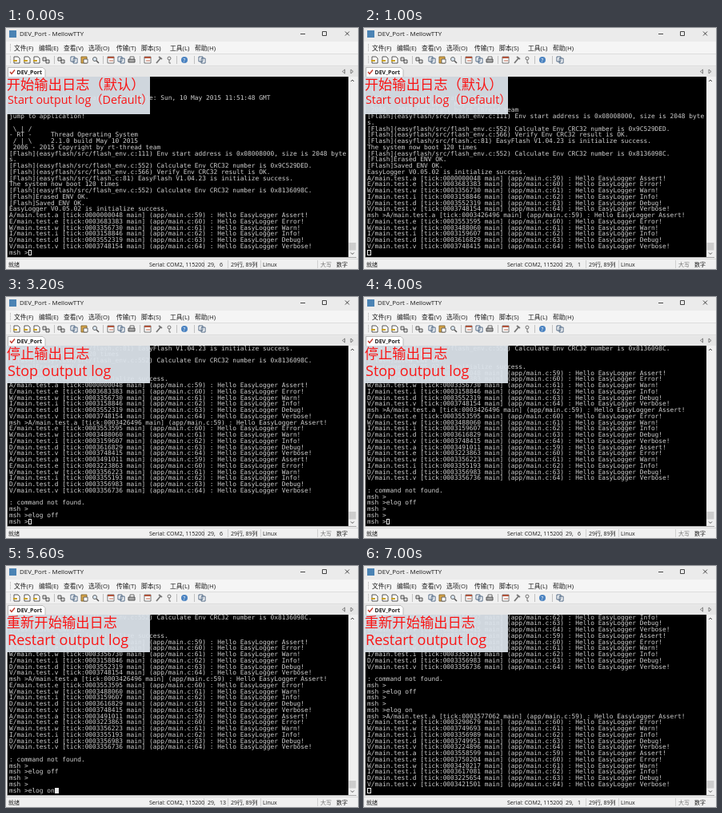
An HTML page for the animation above (8 s loop, 440x302 px).

```html
<!DOCTYPE html>
<html lang="zh">
<head>
<meta charset="utf-8">
<title>Terminal log control</title>
<style>
html, body { margin: 0; width: 100%; height: 100%; overflow: hidden; background: #f0f0f0; }
#stage { position: relative; width: 440px; height: 302px; overflow: hidden; background: #f0f0f0; }
svg { position: absolute; left: 0; top: 0; font: 7.6px "Open Sans", "Noto Sans CJK SC", "Noto Sans CJK", sans-serif; fill: #1c1c1c; }
#term { position: absolute; left: 2px; top: 61px; width: 426px; height: 226px; overflow: hidden; background: #000; }
#log { position: absolute; margin: 0; left: 2px; top: -.4px; color: #cfcfcf; white-space: pre;
  font: 7.865px/7.75px "DejaVu Sans Mono", monospace; }
#cursor { position: absolute; top: 216.5px; width: 4.7px; height: 7.5px; box-sizing: border-box; border: 1px solid #e8e8e8; }
#note { position: absolute; left: 0; top: 61px; width: 180px; height: 47px; background: rgba(220, 228, 235, .94); }
#note text { fill: #fa1414; }
#note svg { font-size: 17.3px; }
</style>
</head>
<body>
<div id="stage">
  <svg width="440" height="302">
    <rect width="440" height="17" fill="#ebebeb"/>
    <rect x="4" y="3" width="9" height="9" fill="#4b83b4"/>
    <text x="17" y="10" font-size="7.9">DEV_Port - MellowTTY</text>
    <path d="M368 7.5h6M395.500 4.500h5v5h-5zM424 4.500l5 5m0-5l-5 5" fill="none" stroke="#333" stroke-width=".9"/>
    <rect y="17" width="440" height="16" fill="#f5f5f5"/>
    <g id="menu" font-size="7.8"></g>
    <rect y="32" width="440" height="15" fill="#f1f1f1"/>
    <path d="M0 32.500h440M0 47.500h440" stroke="#dcdcdc"/>
    <path d="M5.500 20v10M5.500 35v10" stroke="#aaa" stroke-dasharray="1 1"/>
    <g id="tools" stroke-width=".9"></g>
    <path d="M0 61V48.500h440V61z" fill="#e6e6e6"/>
    <path d="M2.500 61V49.500H46l3 3V61" fill="#fff" stroke="#aaa" stroke-width=".8"/>
    <path d="M5 55l2 2.500 4-5" fill="none" stroke="#c0392b" stroke-width="1.400"/>
    <text x="13.500" y="57.500" font-size="7" font-weight="700">DEV_Port</text>
    <path d="M423.500 52v5l-3-2.500zM431 52v5l3-2.500z" fill="none" stroke="#555" stroke-width=".7"/>
    <rect x="428" y="61" width="10" height="226" fill="#f0f0f0"/>
    <rect x="428.500" y="269" width="9" height="9.500" fill="#cdcdcd"/>
    <path d="M431 67l2-2 2 2M431 281.500l2 2 2-2" fill="none" stroke="#505050"/>
    <path d="M1.500 61V287.500H438" fill="none" stroke="#a8a8a8"/>
    <path d="M0 289.500h440" stroke="#d8d8d8"/>
    <path d="M247.500 291v10M277.500 291v10M318.500 291v10M389.500 291v10" stroke="#d0d0d0"/>
    <g id="status" font-size="7"></g>
  </svg>
  <div id="term"><pre id="log"></pre><div id="cursor"></div></div>
  <div id="note"><svg width="180" height="47">
    <text id="cn" x=".8" y="15.500"></text>
    <text id="en" x="2"></text>
  </svg></div>
</div>
<script>
const $ = id => document.getElementById(id);
const ROWS = 29, CHAR = 4.735, LOOP = 8000;

const texts = (id, y, items) => {
  $(id).innerHTML = items.map(([x, s, fill = '#1c1c1c']) => `<text x="${x}" y="${y}" fill="${fill}">${s}</text>`).join('');
};
texts('menu', 27.5, [[10, '文件(F)'], [41, '编辑(E)'], [72, '查看(V)'], [103, '选项(O)'],
  [138, '传输(T)'], [169, '脚本(S)'], [205, '工具(L)'], [236, '帮助(H)']]);
texts('status', 298.5, [[3, '就绪'], [179, 'Serial: COM2, 115200'], [252, '29,'], [267, ''],
  [281, '29行, 89列'], [321, 'Linux'], [393, '大写', '#777'], [413, '数字']]);
const column = $('status').children[3];

// Toolbar glyphs are drawn around their own centre.
const glyphs = {
  page: '<path d="M-3-4h5l2 2v6h-7z" fill="#fff" stroke="#444"/><path d="M-4 1h5" stroke="#c9a227" stroke-width="2"/>',
  link: '<path d="M-4-3h4v4h-4zM0 0h4v4h-4z" fill="#ddd" stroke="#444"/>',
  copy: '<path d="M-4-4h5v6h-5zM-1-2h5v6h-5z" fill="#fff" stroke="#3d5878"/>',
  paste: '<path d="M-4-4h7v8h-7z" fill="#d8a64a" stroke="#80622c"/><path d="M-1-1h5v5h-5z" fill="#fff" stroke="#555"/>',
  find: '<circle cx="-1" cy="-1" r="2.500" fill="#dceaf6" stroke="#555"/><path d="M1 1l3 3" stroke="#555" stroke-width="1.500"/>',
  print: '<path d="M-2-4h5v4h-5z" fill="#fff" stroke="#555"/><path d="M-4-1h8v4h-8z" fill="#aaa" stroke="#444"/>',
  sheet: '<path d="M-4-4h8v8h-8z" fill="#fff" stroke="#666"/><path d="M-4-3h8" stroke="#b3543c" stroke-width="2"/><path d="M-2 1h5" stroke="#b3543c"/>',
  tool: '<path d="M-3 4l5-6M0-4l4 3" fill="none" stroke="#777" stroke-width="1.800"/>',
  key: '<circle cy="-2" r="2" fill="none" stroke="#666"/><path d="M0 0v4h2" fill="none" stroke="#666"/>',
  help: '<circle r="4" fill="#4a82c0"/><text x="-1.700" y="2.500" font-size="7" fill="#fff">?</text>',
  bar: '<path d="M0-5v10" stroke="#bbb"/>'
};
$('tools').innerHTML = [[13, 'page'], [26, 'page'], [38, 'page'], [50, 'link'], [60.5, 'bar'], [69, 'link'],
  [85, 'copy'], [98, 'paste'], [112, 'find'], [121.5, 'bar'], [131, 'sheet'], [144, 'copy'], [157, 'print'],
  [167.5, 'bar'], [177, 'sheet'], [191, 'tool'], [204, 'key'], [213.5, 'bar'], [223, 'help'], [235.5, 'bar'], [245, 'copy']]
  .map(([x, name]) => `<g transform="translate(${x} 40)">${glyphs[name]}</g>`).join('');

const levels = ['Assert', 'Error', 'Warn', 'Info', 'Debug', 'Verbose'];
const group = (ticks, lead = '') => ticks.map((tick, i) => {
  const c = levels[i][0];
  return `${i ? '' : lead}${c}/main.test.${c.toLowerCase()} [tick:${String(tick).padStart(10, '0')} main] ` +
    `(app/main.c:${59 + i}) : Hello EasyLogger ${levels[i]}!`;
});
const flash = (line, msg) => `[Flash](easyflash/src/flash_env.c:${line}) ${msg}`;
const prompt = 'msh >';

const lines = [
  '', '', '',
  '[Boot] check the firmware compile date: Sun, 10 May 2015 11:51:48 GMT',
  '', '',
  'jump to application!',
  '',
  ' \\ | /',
  '- RT -     Thread Operating System',
  ' / | \\     2.1.0 build May 10 2015',
  ' 2006 - 2015 Copyright by rt-thread team',
  flash(111, 'Env start address is 0x08008000, size is 2048 byte'),
  's.',
  flash(552, 'Calculate Env CRC32 number is 0x9C529DED.'),
  flash(566, 'Verify Env CRC32 result is OK.'),
  '[Flash](easyflash/src/flash.c:81) EasyFlash V1.04.23 is initialize success.',
  'The system now boot 120 times',
  flash(552, 'Calculate Env CRC32 number is 0x8136098C.'),
  '[Flash]Erased ENV OK.',
  '[Flash]Saved ENV OK.',
  'EasyLogger V0.05.02 is initialize success.',
  ...group([48, 3683383, 3356730, 3158846, 3552319, 3748154]),
  ...group([3426496, 3553595, 3488060, 3159607, 3616829, 3748415], prompt),
  ...group([3491011, 3223863, 3356223, 3355193, 3356983, 3356736]),
  '', ': command not found.',
  prompt, prompt + 'elog off', prompt, prompt, prompt + 'elog on',
  ...group([3577062, 3290679, 3749693, 3356989, 3749951, 3224896], prompt),
  ...group([3558599, 3750204, 3420217, 3617081, 3225654, 3421501])
];

const notes = {
  start: ['开始输出日志（默认）', 'Start output log（Default）', 14.3, 34],
  stop: ['停止输出日志', 'Stop output log', 18, 38],
  restart: ['重新开始输出日志', 'Restart output log', 18, 38]
};

// time, bottom line, characters on it, note
const steps = [
  [0, 28, 5, 'start'],
  [1000, 34, 0, 'start'],
  [2000, 44, 5, 'stop'],
  [4000, 46, 5, 'stop'],
  [5000, 46, 12, 'restart'],
  [6000, 53, 0, 'restart'],
  [7000, 59, 0, 'restart']
];

let shown;
function show(step) {
  const [, end, len, name] = step;
  const last = (lines[end] || '').slice(0, len);
  $('log').textContent = [...lines.slice(end - ROWS + 1, end), last].join('\n');
  $('cursor').style.left = 2 + len * CHAR + 'px';
  $('cursor').style.background = len > 5 ? '#e8e8e8' : 'none';
  column.textContent = len + 1;
  const [cn, en, size, y] = notes[name];
  $('cn').textContent = cn;
  $('en').textContent = en;
  $('en').setAttribute('font-size', size);
  $('en').setAttribute('y', y);
}

const origin = performance.now();
function tick() {
  const t = Math.max(0, performance.now() - origin) % LOOP;
  const step = steps.findLast(s => s[0] <= t);
  if (step !== shown) show(shown = step);
  requestAnimationFrame(tick);
}
tick();
</script>
</body>
</html>
```
